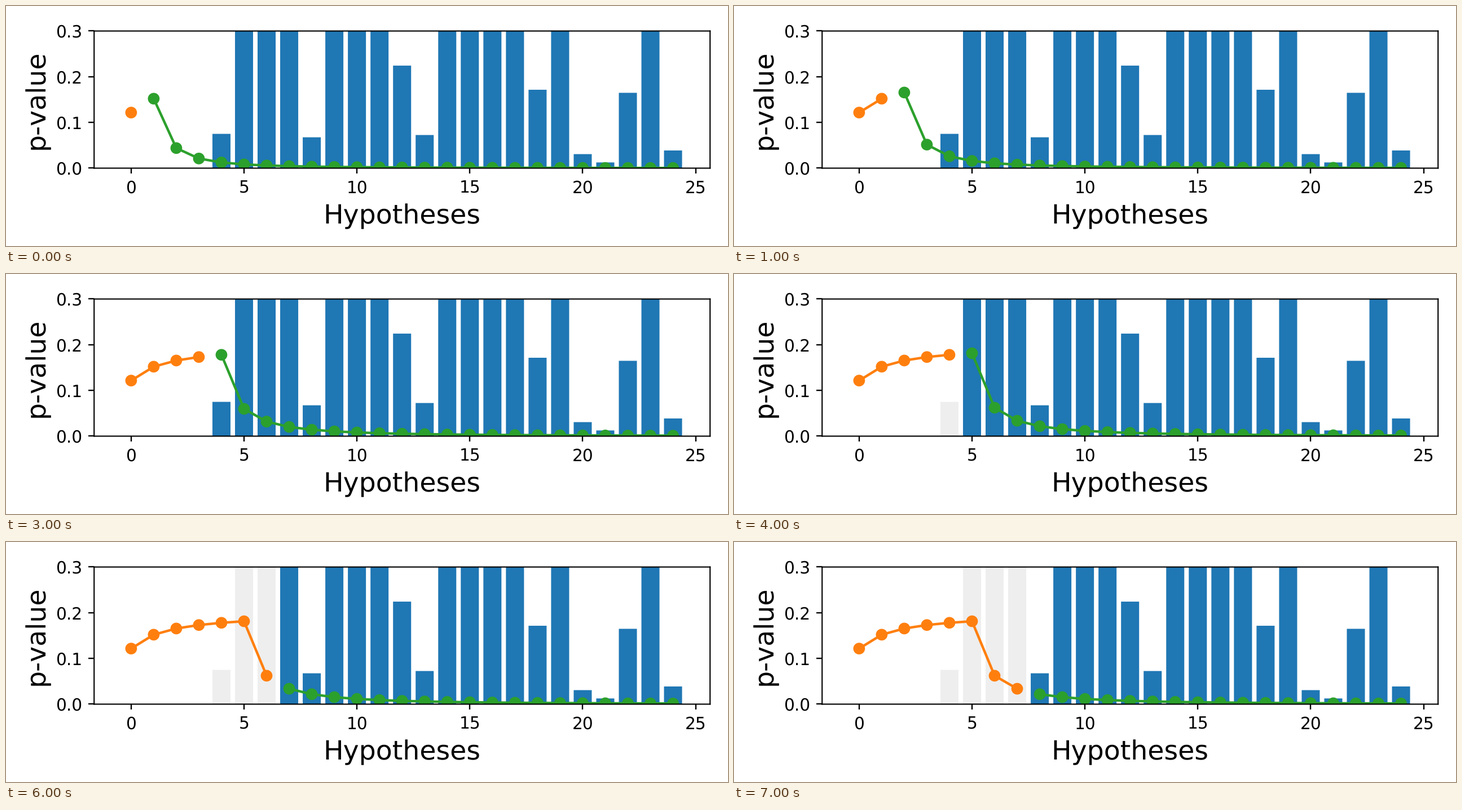
Recreate the animation shown at these times as a matplotlib script. Size 1280 by 427 pixels, loop 8000 ms.

```python
import matplotlib.pyplot as plt
import numpy as np
from matplotlib.animation import FuncAnimation

W, H, DPI = 1280, 427, 640 / 3
COUNT, STEPS, STEP_MS = 25, 8, 1000
ALPHA = 0.2
BLUE, ORANGE, GREEN, GRAY = "#1f77b4", "#ff7f0e", "#2ca02c", "#eeeeee"

index = np.arange(COUNT)
p_values = np.ones(COUNT)
p_values[:4] = 0
for i, p in {4: 0.075, 8: 0.0675, 12: 0.2243, 13: 0.0725, 18: 0.1715,
             20: 0.0307, 21: 0.0125, 22: 0.1648, 24: 0.0387}.items():
    p_values[i] = p


def gamma(k):
    """Weights proportional to 1/k^2 that sum to one."""
    return 6 / (np.pi * k) ** 2


def thresholds(step):
    """Online test levels, knowing only the p-values up to step."""
    levels, rejected = np.zeros(COUNT), []
    for t in index:
        levels[t] = ALPHA * (gamma(t + 1) + sum(gamma(t - r) for r in rejected))
        if t <= step and p_values[t] <= levels[t]:
            rejected.append(t)
    return levels


plt.rcParams.update({"font.family": "DejaVu Sans", "axes.linewidth": 0.72,
                     "text.kerning_factor": 6, "text.hinting": "none"})
# The tiny margin keeps the pixel size from rounding down.
fig = plt.figure(figsize=((W + 1e-6) / DPI, (H + 1e-6) / DPI), dpi=DPI,
                 facecolor="white")
left, right, top, bottom = 156.2, 1248.2, 44.5, 288.5
ax = fig.add_axes([left / W, 1 - bottom / H,
                   (right - left) / W, (bottom - top) / H])

bars = ax.bar(index, p_values, width=0.8, color=BLUE, snap=False)
past, = ax.plot([], [], color=ORANGE)
future, = ax.plot([], [], color=GREEN)
# Per-point colours let the dots sit between whole pixels.
dots = ax.scatter(index, p_values, s=7 ** 2, c=[GREEN] * COUNT, lw=0, zorder=2)

ax.set_xlim(-1.64, 25.64)
ax.set_ylim(0, 0.3)
ax.set_xticks(range(0, 26, 5))
ax.set_yticks([0, 0.1, 0.2, 0.3], ["0.0", "0.1", "0.2", "0.3"])
ax.tick_params(axis="x", pad=3.8)
ax.set_xlabel("Hypotheses", fontsize=16, labelpad=4.3)
ax.set_ylabel("p-value", fontsize=16)
for spine in ax.spines.values():
    spine.set_snap(False)


def update(step):
    levels = thresholds(step)
    split = step + 1
    past.set_data(index[:split], levels[:split])
    future.set_data(index[split:], levels[split:])
    dots.set_offsets(np.column_stack([index, levels]))
    dots.set_facecolor([ORANGE if i <= step else GREEN for i in index])
    for i, bar in enumerate(bars):
        bar.set_facecolor(GRAY if i <= step else BLUE)
    return [*bars, past, future, dots]


anim = FuncAnimation(fig, update, frames=STEPS, interval=STEP_MS,
                     init_func=lambda: update(0), repeat=True, repeat_delay=0)
plt.show()
```
